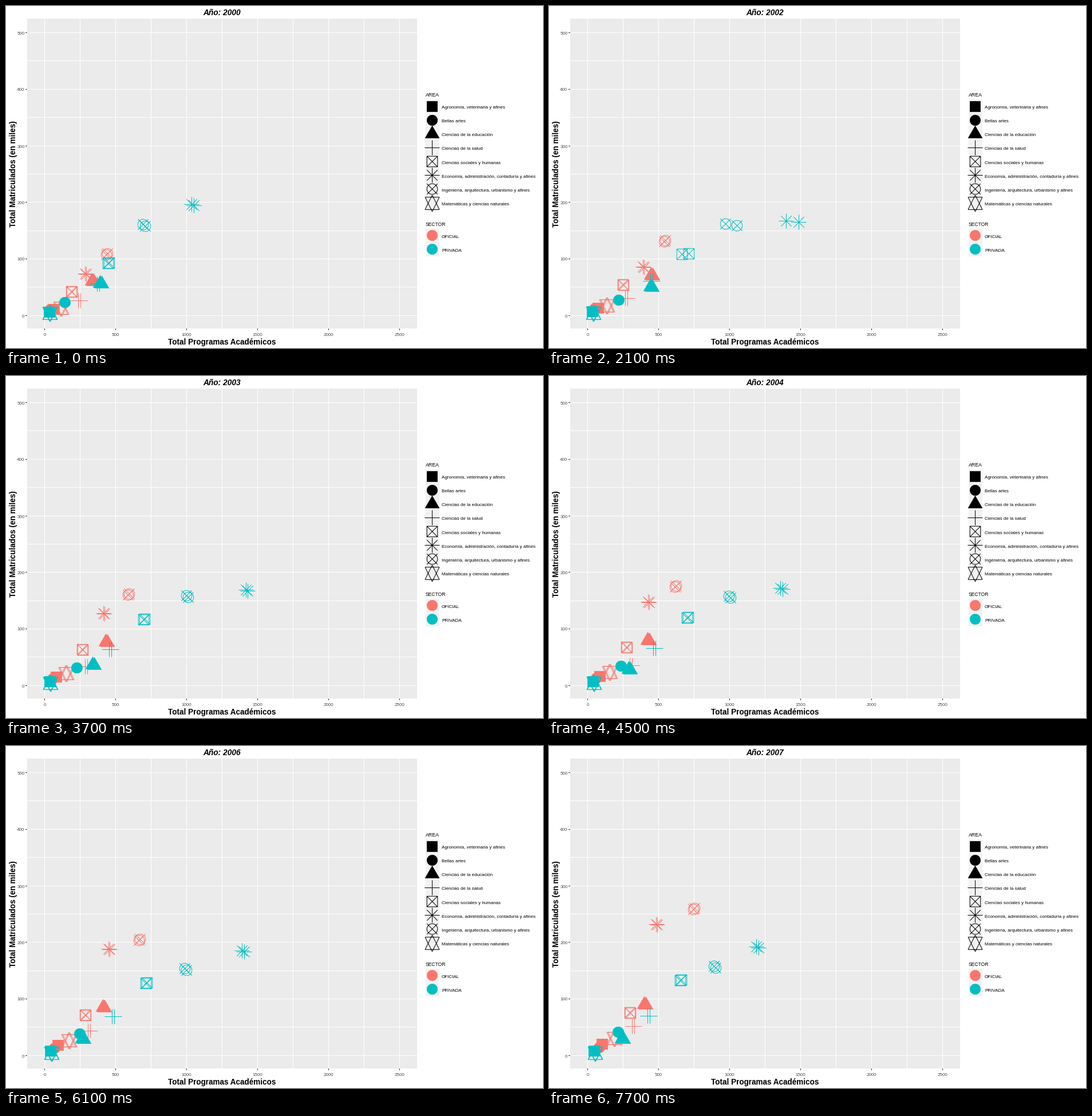
Recreate the animation shown at these times as a matplotlib script. Size 938x597 px, loop 8000 ms.

```python
import numpy as np
import matplotlib.pyplot as plt
from matplotlib.animation import FuncAnimation
from matplotlib.patches import PathPatch, Rectangle
from matplotlib.path import Path

W, H, DPI = 938, 597, 64
PX = 72 / DPI                      # points per pixel
RED, TEAL = "#F8766D", "#00BFC4"
R = 9.25                           # base symbol radius

plt.rcParams["path.simplify"] = False
fig = plt.figure(figsize=(W / DPI, H / DPI), dpi=DPI, facecolor="white")
ax = fig.add_axes([0, 0, 1, 1])
ax.set_xlim(0, W)
ax.set_ylim(H, 0)
ax.axis("off")


# ---------- symbols ----------
def outline(*polylines):
    codes = [c for p in polylines for c in [Path.MOVETO] + [Path.LINETO] * (len(p) - 1)]
    return np.concatenate([np.array(p, float) for p in polylines]) * R, codes


def triangle(apex, base):
    return [(0, apex), (1.347, base), (-1.347, base), (0, apex)]


angle = np.linspace(0, 2 * np.pi, 49)
circle = np.column_stack([np.cos(angle), np.sin(angle)])
square = [(-1, -1), (1, -1), (1, 1), (-1, 1), (-1, -1)]
cross = [[(-1, -1), (1, 1)], [(-1, 1), (1, -1)]]
plus = [[(-1.414, 0), (1.414, 0)], [(0, -1.414), (0, 1.414)]]

SYMBOLS = {
    "agro": outline(square),
    "artes": outline(circle),
    "edu": outline(triangle(-1.555, 0.778)),
    "salud": outline(*plus),
    "social": outline(square, *cross),
    "econ": outline(*plus, *cross),
    "ing": outline(circle, *cross),
    "mat": outline(triangle(-1.555, 1.166), triangle(1.555, -1.166)),
}
FILLED = {"agro", "artes", "edu"}


def symbol_path(kind, x, y):
    verts, codes = SYMBOLS[kind]
    return Path(verts + (np.floor(x) + 0.5, np.floor(y) + 0.5), codes)


def add_symbol(kind, color, x, y, z):
    fill = kind in FILLED
    patch = PathPatch(symbol_path(kind, x, y), facecolor=color if fill else "none",
                      edgecolor=color, lw=PX * (0.5 if fill else 1), snap=False, zorder=z)
    return ax.add_patch(patch)


# ---------- static chart ----------
def label(x, y, text, size, **kw):
    return ax.text(x, y, text, fontsize=size * PX, family="Liberation Sans",
                   va="baseline", rotation_mode="anchor", **kw)


def line(xs, ys, color):
    ax.plot(xs, ys, color=color, lw=PX, snap=False, solid_capstyle="butt", zorder=2)


def box(x, y, w, h, color):
    ax.add_patch(Rectangle((x, y), w, h, facecolor=color, lw=0, snap=False, zorder=1))


LEFT, TOP, RIGHT, BOTTOM = 37, 22, 718, 563
box(LEFT, TOP, RIGHT - LEFT, BOTTOM - TOP, "#EBEBEB")
for k in range(11):
    gx = 67.5 + 62 * k
    gy = np.floor(540.2 - 49.36 * k) + 0.5
    line([gx, gx], [TOP, BOTTOM], "white")
    line([LEFT, RIGHT], [gy, gy], "white")
    if k % 2 == 0:
        line([gx, gx], [BOTTOM, BOTTOM + 3], "#333333")
        line([LEFT - 3, LEFT], [gy, gy], "#333333")
        label(gx, 575.5, str(250 * k), 8, color="#4D4D4D", ha="center")
        label(32.5, gy + 3, str(50 * k), 8, color="#4D4D4D", ha="right")

label(377, 591, "Total Programas Académicos", 13.5, weight="bold", ha="center")
label(17, 293.5, "Total Matriculados (en miles)", 13.5, weight="bold", ha="center", rotation=90)
title = label(377, 16, "", 13.8, weight="bold", style="italic", ha="center")

AREAS = ["Agronomía, veterinaria y afines", "Bellas artes", "Ciencias de la educación",
         "Ciencias de la salud", "Ciencias sociales y humanas",
         "Economía, administración, contaduría y afines",
         "Ingeniería, arquitectura, urbanismo y afines", "Matemáticas y ciencias naturales"]
label(732.5, 158, "AREA", 8.9)
box(733, 163, 24, 194, "#F2F2F2")
for i, (kind, area) in enumerate(zip(SYMBOLS, AREAS)):
    y = 175 + 24.15 * i
    add_symbol(kind, "black", 744, y, 5)
    label(761, y + 4, area, 8.05)
label(732.5, 384, "SECTOR", 8.5)
box(733, 389, 24, 48, "#F2F2F2")
for y, color, sector in [(400, RED, "OFICIAL"), (424, TEAL, "PRIVADA")]:
    add_symbol("artes", color, 744, y, 5)
    label(761, y + 5, sector, 8.1)


# ---------- moving points ----------
moving = []


def series(kind, color, *keys, gap=(1, 0), surge=0):
    """Straight moves between (step, x, y) keys, drawn once per semester.

    The semesters lie a gap apart; a surge widens it around 2002.
    """
    for side in (-0.5, 0.5):
        patch = add_symbol(kind, color, 0, 0, 10 + len(moving))
        moving.append((kind, patch, np.transpose(keys), side * np.array(gap), surge))


def position(step, keys, offset, surge):
    steps, xs, ys = keys
    widen = 1 + surge * np.exp(-((step - 5.5) / 1.5) ** 2)
    return (np.interp(step, steps, xs) + offset[0] * widen + 0.5,
            np.interp(step, steps, ys) + offset[1] + 0.5)


series("mat", RED, (0, 96, 527), (19, 114, 510), gap=(2, 0))
series("ing", RED, (0, 176, 433), (5, 202, 410), (16, 236, 331), (19, 253, 284), gap=(2, -2))
series("econ", RED, (0, 139, 467), (5, 165, 455), (16, 182, 344), (19, 188, 311), gap=(2, 1))
series("social", RED, (0, 114, 498), (5, 129, 486), (11, 135, 473), (19, 141, 465), gap=(1, 1))
series("salud", RED, (0, 128, 514), (11, 143, 505), (19, 147, 489), gap=(4, 0))
series("edu", RED, (0, 151, 480), (5, 179, 470), (19, 167, 451), gap=(3, 1))
series("artes", RED, (0, 77, 529), (19, 87, 526))
series("agro", RED, (0, 83, 529), (19, 92, 520))

series("mat", TEAL, (0, 76, 536), (19, 80, 536))
series("ing", TEAL, (0, 241, 382), (3, 269, 375), (5, 318, 381), (16, 313, 390),
       (19, 289, 385), gap=(3, 3), surge=6)
series("econ", TEAL, (0, 326, 347), (3, 364, 357), (5, 425, 376), (8, 428, 376),
       (11, 406, 371), (16, 416, 355), (19, 364, 351), gap=(3.5, 2), surge=6)
series("social", TEAL, (0, 179, 448), (3, 203, 433), (5, 238, 432), (16, 246, 412),
       (19, 230, 408), gap=(2, -1), surge=6)
series("salud", TEAL, (0, 161, 485), (5, 179, 480), (15, 187, 472), (19, 174, 471), gap=(4, 0))
series("edu", TEAL, (0, 165, 484), (5, 178, 490), (11, 140, 512), (19, 128, 511), gap=(3, 1))
series("artes", TEAL, (0, 102, 517), (5, 121, 513), (15, 128, 502), (19, 120, 499))
series("agro", TEAL, (0, 75, 534), (19, 78, 532))


def year(step):
    """Fifteen years pass in 39 steps."""
    return 2000 + int(step * 15 / 39 + 0.5)


def update(frame):
    step = 0 if frame < 5 else 1 + (frame - 5) // 4
    title.set_text(f"Año: {year(step)}")
    for kind, patch, keys, offset, surge in moving:
        patch.set_path(symbol_path(kind, *position(step, keys, offset, surge)))
    return [title] + [m[1] for m in moving]


anim = FuncAnimation(fig, update, frames=80, interval=100, repeat=True, repeat_delay=0)
plt.show()
```
